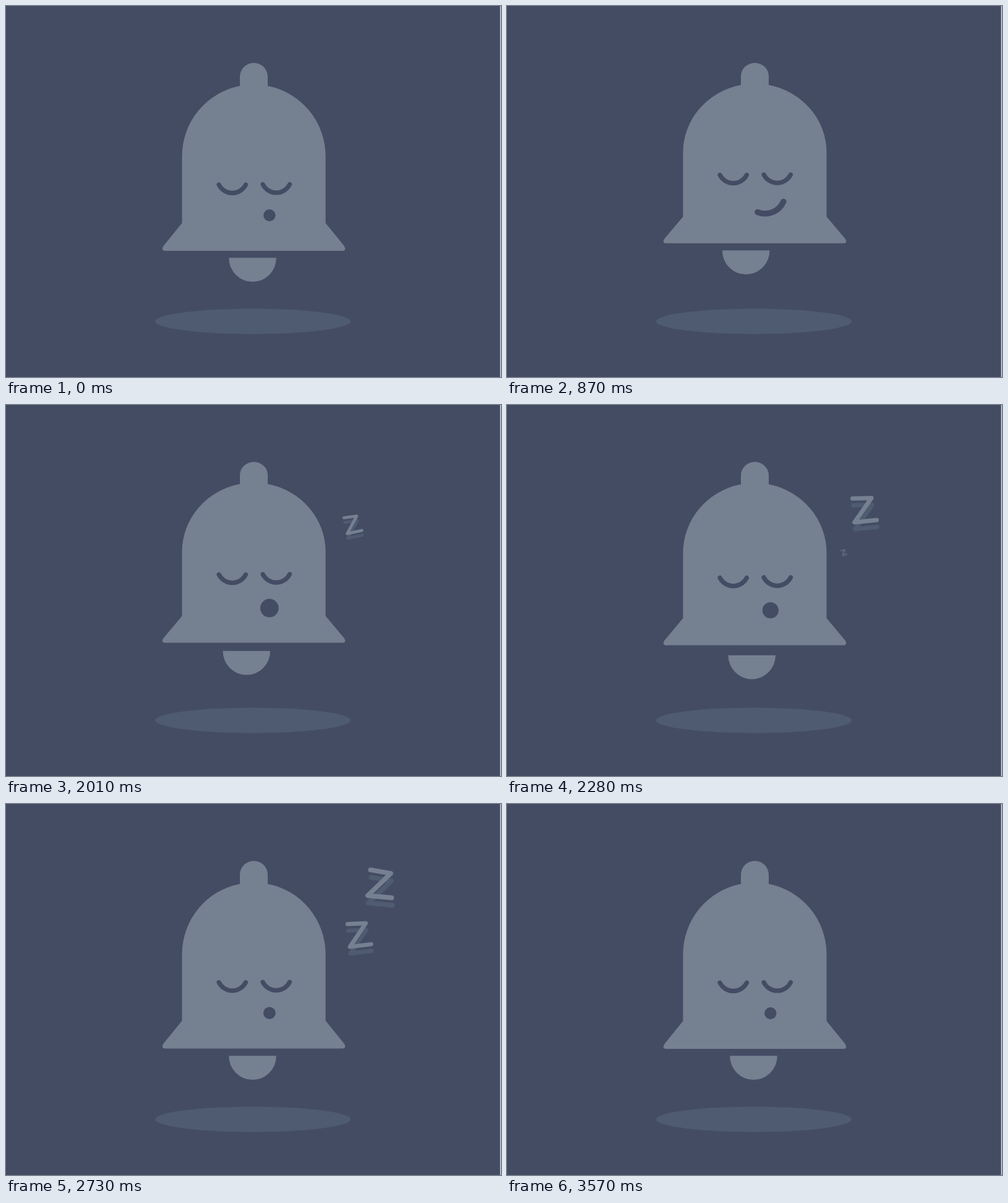
An HTML page with a canvas that plays this animation: 800 by 600 pixels, repeating every 3600 ms.

```html
<!DOCTYPE html>
<html lang="en">
<head>
<meta charset="utf-8">
<title>Sleeping bell</title>
<style>
  html, body { margin: 0; width: 100%; height: 100%; overflow: hidden; background: #444c64; }
  canvas { display: block; }
</style>
</head>
<body>
<canvas id="stage" width="800" height="600"></canvas>
<script>
const ctx = document.getElementById('stage').getContext('2d');
const LOOP = 3600;
const NIGHT = '#444c64', BELL = '#758091', SHADE = '#4e5b71';

const bell = new Path2D(`M378 129.2V114.5a22.5 22.5 0 0 1 45 0V129.2
  A116 116 0 0 1 516.5 243V351L546.5 388Q551 396 543 396H258
  Q250 396 254.5 388L284.5 351V243A116 116 0 0 1 378 129.2Z`);
const eyes = new Path2D(`M344 289A24.3 24.3 0 0 0 387.5 289
  M415 288.5A24.3 24.3 0 0 0 458.5 288.5`);
const smile = new Path2D('M-21 5.5A32.3 32.3 0 0 0 21 -11.5');
const zed = new Path2D('M-19 -21L14.2 -19.7L-18 20.8L20.9 19.1');

const ramp = (t, from, to) => Math.min(1, Math.max(0, (t - from) / (to - from)));
const ease = (t, from, to) => (1 - Math.cos(Math.PI * ramp(t, from, to))) / 2;
// Rises over [a, b], holds, falls over [c, d]
const swell = (t, a, b, c, d) => ease(t, a, b) - ease(t, c, d);

function at(x, y, draw) {
  ctx.save();
  ctx.translate(x, y);
  draw();
  ctx.restore();
}

function disc(x, y, rx, ry, color, end = 2 * Math.PI) {
  ctx.fillStyle = color;
  ctx.beginPath();
  ctx.ellipse(x, y, rx, ry, 0, 0, end);
  ctx.fill();
}

function stroke(path, color, width) {
  ctx.strokeStyle = color;
  ctx.lineWidth = width;
  ctx.stroke(path);
}

function drawMouth(t, breath) {
  at(425.8, 338.5 - 10.7 * breath, () => {
    const open = 1 - ramp(t, 20, 150) + ease(t, 1380, 1620);
    if (open > 0) {
      const r = open * (9.7 + 5.5 * breath);
      disc(0, 0, r, r, NIGHT);
    }
    const size = swell(t, 100, 470, 1200, 1440);
    if (size > 0.01) {
      ctx.scale(size, size);
      stroke(smile, NIGHT, 9.5);
    }
  });
}

// x, y: position 820 ms after birth; vx, vy: drift per ms
function drawZed(age, x, y, vx, vy) {
  if (age <= 0 || age >= 1350) return;
  const size = 1 - (1 - ramp(age, 0, 800)) ** 2;
  const drift = age - 820;
  const layer = (dx, dy, color) => at(x + vx * drift + dx, y + vy * drift + dy, () => {
    ctx.rotate((2.5 + 0.0245 * drift) * Math.PI / 180);
    ctx.scale(size, size);
    stroke(zed, color, 7.6);
  });
  ctx.globalAlpha = ramp(age, 0, 120) * (1 - ramp(age, 1080, 1350));
  layer(1, 12 * size, SHADE);
  layer(0, 0, BELL);
  ctx.globalAlpha = 1;
}

function draw(t) {
  const breath = swell(t, 0, 740, 1850, 2855);
  const swing = swell(t, 0, 840, 1800, 2500);

  ctx.fillStyle = NIGHT;
  ctx.fillRect(0, 0, 800, 600);
  ctx.fillStyle = '#d5d9e1';
  ctx.fillRect(798.6, 0, 1.4, 600);

  disc(399, 510, 158, 20.5, SHADE);
  disc(398.5 - 12.3 * swing, 407.3 - 12 * swing, 38.3, 38.8, BELL, Math.PI);

  at(0, 92, () => {
    ctx.scale(1, 1 - 0.04 * breath);
    ctx.translate(0, -92);
    ctx.fillStyle = BELL;
    ctx.fill(bell);
  });

  at(0, -15.8 * breath, () => stroke(eyes, NIGHT, 7.2));
  drawMouth(t, breath);
  drawZed(t - 1700, 592, 148.5, 0.0624, -0.088);
  drawZed(t - 2200, 587, 194, 0.0578, -0.06);
}

ctx.lineCap = ctx.lineJoin = 'round';
const start = performance.now();
function tick() {
  draw((performance.now() - start) % LOOP);
  requestAnimationFrame(tick);
}
tick();
</script>
</body>
</html>
```
